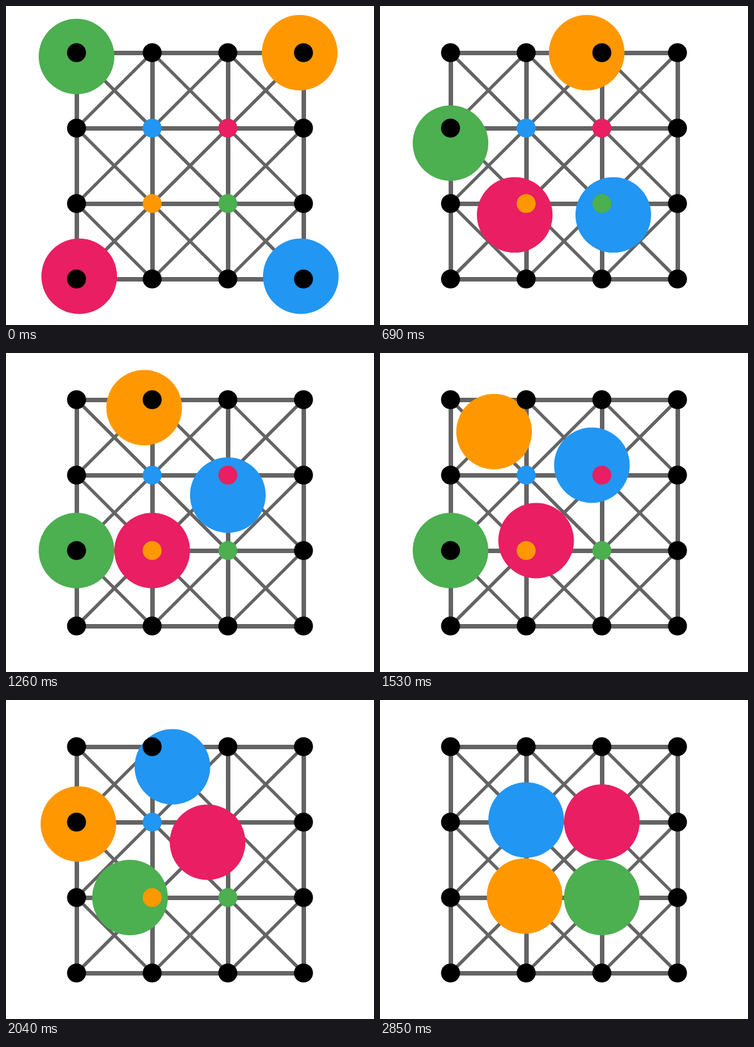
An HTML page with a canvas for the animation above (2880 ms loop, 574x499 px).

```html
<!DOCTYPE html>
<html>
<head>
<meta charset="utf-8">
<style>
  html, body { margin: 0; width: 574px; height: 499px; overflow: hidden; background: #fff; }
  canvas { display: block; }
</style>
</head>
<body>
<canvas id="stage" width="574" height="499"></canvas>
<script>
const ctx = document.getElementById('stage').getContext('2d');
const CELL = 118, LEFT = 110, TOP = 73, STEP = 30, STEPS = 96;
const D = Math.SQRT2;
const GREEN = '#4caf50', ORANGE = '#ff9800', PINK = '#e91e63', BLUE = '#2196f3';

// Moves are [departure, x, y]; discs travel one cell per time unit.
const discs = [
  { color: GREEN, start: [0, 0], home: [2, 2], moves: [[0, 0, 2], [2.743, 2, 2]] },
  { color: ORANGE, start: [3, 0], home: [1, 2], moves: [[0, 1, 0], [2, 0, 1], [2 + D, 1, 2]] },
  { color: PINK, start: [0, 3], home: [2, 1], moves: [[0, 1, 2], [1 + D, 2, 1]] },
  { color: BLUE, start: [3, 3], home: [1, 1],
    moves: [[0, 2, 2], [D, 2, 1], [1 + D, 1, 0], [1 + 2 * D, 1, 1]] },
];

function position({ start, moves }, time) {
  let [x, y] = start;
  for (const [departure, toX, toY] of moves) {
    if (time <= departure) break;
    const dx = toX - x, dy = toY - y;
    const part = Math.min(1, (time - departure) / Math.hypot(dx, dy));
    x += dx * part;
    y += dy * part;
  }
  return [x, y];
}

function circle(x, y, radius, color) {
  ctx.fillStyle = color;
  ctx.beginPath();
  ctx.arc(LEFT + x * CELL, TOP + y * CELL, radius, 0, 2 * Math.PI);
  ctx.fill();
}

function line(x1, y1, x2, y2, width, shift = 0) {
  ctx.lineWidth = width;
  ctx.beginPath();
  ctx.moveTo(LEFT + x1 * CELL + shift, TOP + y1 * CELL + shift);
  ctx.lineTo(LEFT + x2 * CELL + shift, TOP + y2 * CELL + shift);
  ctx.stroke();
}

function drawGrid() {
  ctx.strokeStyle = '#646464';
  for (let i = 0; i < 4; i++) {
    line(0, i, 3, i, 7, 0.5);
    line(i, 0, i, 3, 7, 0.5);
  }
  for (let i = 1; i < 4; i++) {
    line(0, i, i, 0, 5);
    line(3 - i, 3, 3, 3 - i, 5);
    line(0, 3 - i, i, 3, 5);
    line(3 - i, 0, 3, i, 5);
  }
}

function drawDots() {
  for (let y = 0; y < 4; y++) {
    for (let x = 0; x < 4; x++) {
      const owner = discs.find(({ home }) => home[0] === x && home[1] === y);
      circle(x, y, 14.8, owner ? owner.color : '#000');
    }
  }
}

function draw() {
  const step = Math.floor(performance.now() / STEP) % STEPS + 1;
  ctx.fillStyle = '#fff';
  ctx.fillRect(0, 0, 574, 499);
  drawGrid();
  for (const disc of discs) circle(...position(disc, step / 20), 59, disc.color);
  drawDots();
  requestAnimationFrame(draw);
}
draw();
</script>
</body>
</html>
```
